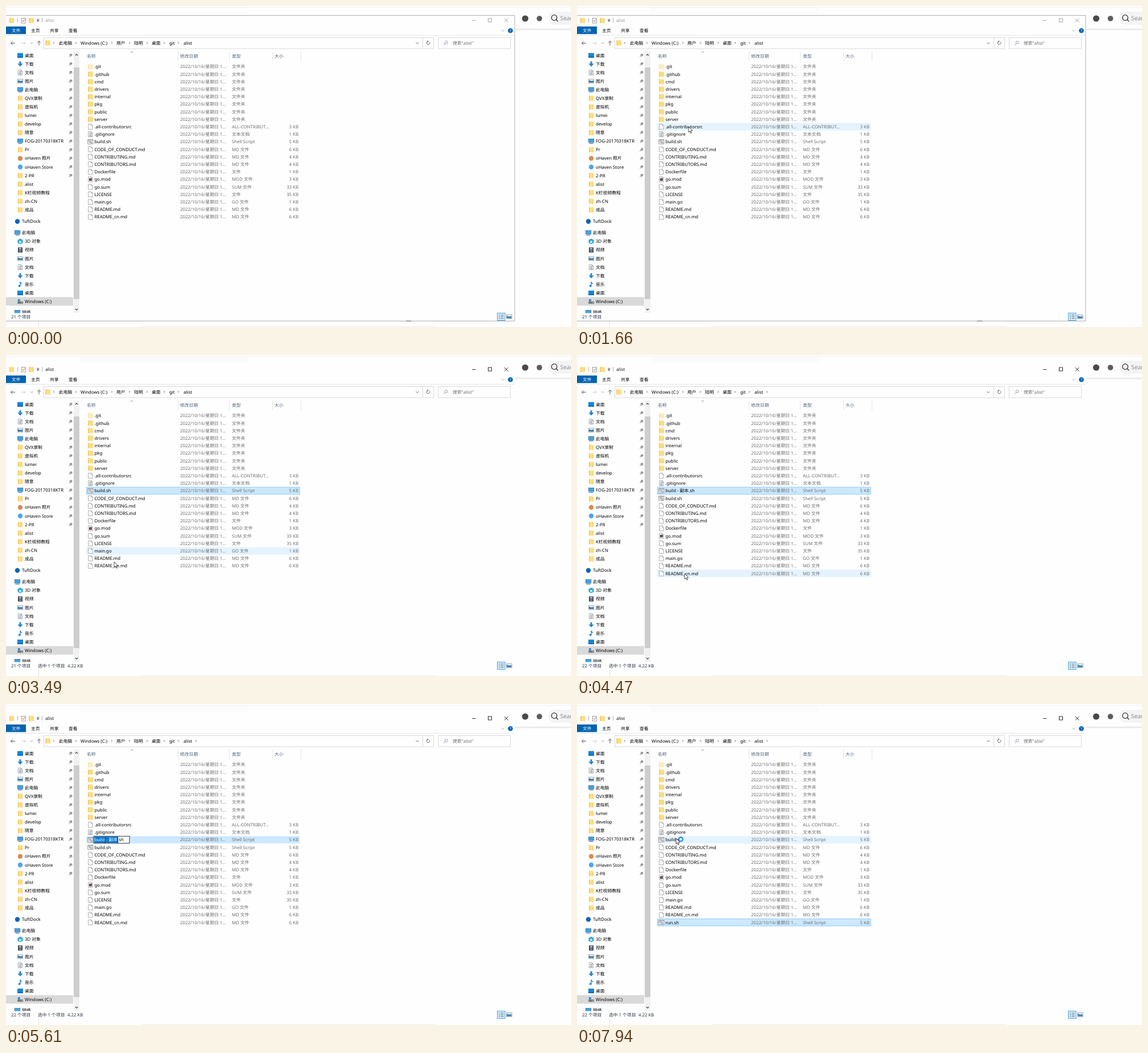
These frames come from a looping animation (993 by 564 pixels, 8000 ms). An HTML page:

```html
<!DOCTYPE html>
<html lang="zh-CN">
<head>
<meta charset="utf-8">
<style>
html, body { margin: 0; width: 100%; height: 100%; overflow: hidden; background: #fefefe; }
svg { display: block; font: 7.8px 'Noto Sans', 'Noto Sans CJK SC', sans-serif; text-rendering: geometricPrecision; }
.ime { font: 300 9.8px 'Noto Serif', 'Noto Sans CJK SC', serif; }
.typed { font: 9.5px Roboto, sans-serif; }
</style>
</head>
<body>
<svg width="993" height="564" viewBox="0 0 993 564"><g id="base"></g><g id="live"></g></svg>
<script>
const LOOP = 8000, ROW = 13.2, TOP = 106.5, GRAY = '#6d6d6d', BLUE = '#0078d7';

// y is the vertical centre of the text
const text = (x, y, s, fill = '#000', more = '') => `<text x="${x}" y="${y + 2.8}" fill="${fill}" ${more}>${s}</text>`;
const rect = (x, y, w, h, fill, stroke = 'none', more = '') =>
  `<rect x="${x}" y="${y}" width="${w}" height="${h}" fill="${fill}" stroke="${stroke}" ${more}/>`;
const path = (d, stroke, width = 1, fill = 'none') => `<path d="${d}" stroke="${stroke}" stroke-width="${width}" fill="${fill}"/>`;
const dot = (x, y, r, fill, stroke = 'none', width = 1) =>
  `<circle cx="${x}" cy="${y}" r="${r}" fill="${fill}" stroke="${stroke}" stroke-width="${width}"/>`;
const chevron = x => path(`M${x - 1} 63l1.8 1.8-1.8 1.8`, '#555', .8);
const thin = 'stroke-width=".7"';

// Icons, centred on x, y
const icons = {
  folder: (x, y) => rect(x - 4, y - 4.5, 8, 9, '#ffdf82') + rect(x - 4, y - 4.5, 1.2, 9, '#efc04e') + rect(x + 2.6, y - 3, 1.4, 7.5, '#f5cf68'),
  faded: (x, y) => `<g opacity=".5">${icons.folder(x, y)}</g>`,
  doc: (x, y) => path(`M${x - 3.7} ${y - 4.5}h5l2.4 2.4v6.6h-7.4zm5 0v2.4h2.4`, '#8c8c8c', .7, '#fff'),
  lines: (x, y) => icons.doc(x, y) + path(`M${x - 2.3} ${y - 1.7}h4.6m-4.6 1.7h4.6m-4.6 1.7h4.6m-4.6 1.5h4.6`, '#6f8ba3', .8),
  shell: (x, y) => rect(x - 4.6, y - 3.8, 9.2, 7.6, '#f4f4f4', '#777', thin) + path(`M${x - 4.6} ${y - 2.6}h9.2`, '#777', .7) +
    dot(x - 1.3, y - .2, 1.3, 'none', '#6c7f90', .8) + dot(x + 1.5, y + 1.4, 1.3, 'none', '#6c7f90', .8),
  mod: (x, y) => icons.doc(x, y) + rect(x - 2.3, y - 1.8, 4.6, 4.4, '#3c2a2a') + rect(x - .8, y - .4, 1.6, 1.6, '#e88'),
  desk: (x, y) => rect(x - 5, y - 4, 10, 8, '#1685d9') + rect(x - 5, y + 2.5, 10, 1.5, '#0a5fa8'),
  down: (x, y) => path(`M${x - 1.5} ${y - 4.5}h3v4h3.2L${x} ${y + 4.7}l-4.7-5.2h3.2z`, 'none', 0, '#2586cf'),
  image: (x, y) => rect(x - 4.8, y - 3.4, 9.6, 6.8, '#e9f4fb', '#8a8a8a', thin) + path(`M${x - 4} ${y + 2.6}v-4.4l4 1.6 4-.8v3.6z`, 'none', 0, '#2f79ad'),
  pc: (x, y) => rect(x - 4.8, y - 4, 9.6, 6.4, '#3ba3e8', '#4d6f8c', thin) + path(`M${x - 3.5} ${y + 4}h7`, '#52708a', 1.2),
  cube: (x, y) => path(`M${x} ${y - 4.8}l4.5 2.2v5.2l-4.5 2.2-4.5-2.2v-5.2z`, 'none', 0, '#2aa5d8') + rect(x - 2, y - 1, 4, 4, '#bfe8f7'),
  film: (x, y) => rect(x - 4, y - 4.5, 8, 9, '#40464c') + rect(x - 2.2, y - 3.6, 4.4, 3, '#9eb7c6') + rect(x - 2.2, y + .5, 4.4, 3, '#7d8f9c'),
  note: (x, y) => dot(x - 1.4, y + 2.8, 1.9, '#1685d9') + path(`M${x} ${y + 3}v-7.5q.5 2.5 3 3.6`, '#1685d9', 1.3),
  disk: (x, y) => rect(x - 4.8, y, 9.6, 4, '#777') + rect(x - 4, y - 4, 3.6, 3.6, '#1685d9') + rect(x + 1.5, y + 1.5, 2, 1, '#9f9'),
  warm: (x, y) => dot(x, y, 4.2, '#d98a4e'),
  sky: (x, y) => dot(x, y, 4.2, '#4aa6ee'),
  cloud: (x, y) => dot(x, y, 4.2, '#0a66b8')
};

const sidebar = `desk 桌面,down 下载,lines 文档,image 图片,pc 此电脑,folder QVX录制,folder 虚拟机,folder lumei,folder develop,folder 随意,pc FOG-20170318KTR,folder Pr,warm oHaven 照片,sky oHaven Store,folder 2-PR,folder alist,folder K栏视频教程,folder zh-CN,folder 成品`.split(',');
const computer = `cube 3D 对象,film 视频,image 图片,lines 文档,down 下载,note 音乐,desk 桌面,disk Windows (C:)`.split(',');

const files = [
  ...'.git,.github,cmd,drivers,internal,pkg,public,server'.split(',').map((n, i) => [n, i ? 'folder' : 'faded', '文件夹', '']),
  ['.all-contributorsrc', 'doc', 'ALL-CONTRIBUT...', 3], ['.gitignore', 'lines', '文本文档', 1],
  ['build.sh', 'shell', 'Shell Script', 5], ['CODE_OF_CONDUCT.md', 'doc', 'MD 文件', 6],
  ['CONTRIBUTING.md', 'doc', 'MD 文件', 4], ['CONTRIBUTORS.md', 'doc', 'MD 文件', 4],
  ['Dockerfile', 'doc', '文件', 1], ['go.mod', 'mod', 'MOD 文件', 3], ['go.sum', 'doc', 'SUM 文件', 33],
  ['LICENSE', 'doc', '文件', 35], ['main.go', 'doc', 'GO 文件', 1],
  ['README.md', 'doc', 'MD 文件', 6], ['README_cn.md', 'doc', 'MD 文件', 6]
];

function entry(item, x, y) {
  const [icon, ...words] = item.split(' ');
  return icons[icon](x, y) + text(x + 8, y, words.join(' '));
}

function drawPage() {
  return path('M0 2.5H993', '#f2f2f2') + rect(130, 3, 295, 11, '#fbfbfb') +
    path('M895 40.5H993', '#dcdcdc') + path('M895 42H993', '#f3f3f3', 2) +
    dot(912.5, 22, 5.6, '#4a4a4a') + dot(937.5, 22, 4.8, '#5c5c5c') + rect(953, 10, 60, 23, '#f4f4f5', 'none', 'rx="11.5"') +
    dot(963.5, 20.5, 4.8, 'none', '#333', 1.3) + path('M967 24l3.2 3.2', '#333', 1.3) +
    text(974, 21.8, 'Search', '#8a8a8a', 'font-size="10.3"') + path('M57.5 554V564', '#ddd') + path('M238 563.5H755', '#ececec');
}

function drawChrome() {
  let s = rect(0, 16, 894, 538, '#fefefe');
  s += icons.folder(10, 25.5) + path('M20.5 21v8m43-8v8', '#999', .8) + rect(27.5, 21.5, 7, 8.5, '#fff', '#777', thin) +
    path('M29 25.5l1.6 1.8 3-4', '#c4623a') + icons.folder(44.5, 25.5) + path('M54 23.5h4.5', '#333', .8) + path('M54 25.3h4.5l-2.2 2.4z', 'none', 0, '#333');
  s += rect(0, 36, 35, 13.3, '#0063b1') + text(10, 43.2, '文件', '#fff') + text(44, 43.2, '主页') + text(77, 43.2, '共享') + text(110, 43.2, '查看');
  s += path('M870.5 42l2.5 2.5 2.5-2.5', '#999', .8) + dot(886.5, 43.3, 4.3, '#0063b1') + text(886.5, 43.3, '?', '#fff', 'text-anchor="middle" font-size="7"');
  s += path('M0 51.5H894', '#e6e6e6');
  s += path('M16 65.3H8.5l3-3m-3 3l3 3', '#444', .9) + path('M27 65.3h7.5l-3-3m3 3l-3 3', '#ccc', .9) +
    path('M43.3 64.3l1.9 1.9 1.9-1.9', '#777', .8) + path('M58 69v-7.5l-3 3m3-3l3 3', '#444', .9);
  s += rect(66.5, 55.5, 685, 19.5, '#fefefe', '#dadada') + path('M732.5 55.5v19.5', '#dadada') + path('M720.5 64l2.5 2.5 2.5-2.5', '#555', .9) +
    path('M744.5 63.2a2.9 2.9 0 1 1-3-1.2m0-1.5v2.5h-2', '#555', .9) + icons.folder(73.5, 64.8);
  s += [84, 123, 186, 217, 248, 278, 303].map(chevron).join('');
  s += [[93, '此电脑'], [131, 'Windows (C:)'], [194, '用户'], [225, '陆明'], [256, '桌面'], [287, 'git'], [312, 'alist']]
    .map(([x, w]) => text(x, 64.8, w)).join('');
  s += rect(759.5, 55.5, 127, 19.5, '#fefefe', '#dadada') + dot(773.8, 64, 2.4, 'none', '#7b8ca0', .8) + path('M772 66l-2.6 2.6', '#7b8ca0', .9) +
    text(785, 64.8, '搜索"alist"', GRAY);
  s += [[142, '名称'], [306, '修改日期'], [397, '类型'], [472, '大小']].map(([x, w]) => text(x, 88, w, '#4c607a')).join('') +
    path('M302.5 80V97M392.5 80V97M468.5 80V97M518.5 80V97', '#e4e4e4') + path('M218.5 82l2.3-2 2.3 2', '#777', .8);
  return s;
}

function drawSidebar() {
  let s = rect(0, 511.5, 118, 15, '#d9d9d9');
  sidebar.forEach((item, i) => {
    const y = 86.7 + i * 15.08;
    s += entry(item, 25, y);
    if (i < 15) s += path(`M110.5 ${y + 3}l2.2-2.2m-1.6-1.6l3.2 3.2m-2.2-3.2l2-2 2.2 2.2-2 2`, '#5f6468', .8, '#9a9ea2');
  });
  s += entry('cloud TuftDock', 20, 378.5) + entry('pc 此电脑', 20, 398.5);
  computer.forEach((item, i) => s += entry(item, 25, 413.6 + i * 15.08));
  s += `<svg x="0" y="0" width="118" height="539.5">${entry('pc 网络', 20, 538.5)}</svg>`;
  s += rect(119, 80, 10, 459, '#f1f1f1') + rect(119, 108, 10, 407, '#cdcdcd') +
    path('M121.8 87l2.2-2.2 2.2 2.2M121.8 532l2.2 2.2 2.2-2.2', '#444', 1.1);
  s += rect(863.5, 539.5, 13.5, 13, '#d4ecfb', '#4aa8dc') +
    path('M866 543h2m-2 3h2m-2 3h2M869.5 543h5m-5 3h5m-5 3h5', '#556', .9) + icons.image(884.3, 546);
  return s;
}

const route = [[130, 837, 536], [350, 754, 503], [500, 754, 503], [1300, 302, 373], [1640, 196, 212], [1700, 196, 212],
  [2150, 186, 250], [2170, 186, 250], [2400, 184, 239], [3330, 184, 239], [3490, 190, 363], [3750, 193, 425],
  [4180, 193, 425], [4780, 185, 340], [4870, 183, 296], [4940, 183, 247], [5140, 174, 236], [LOOP, 174, 236]];

function pointer(t) {
  const i = Math.max(1, route.findIndex(k => k[0] >= t)), [t0, x0, y0] = route[i - 1], [t1, x1, y1] = route[i];
  const p = Math.max(0, (t - t0) / (t1 - t0));
  return [x0 + (x1 - x0) * p, y0 + (y1 - y0) * p];
}

function drawFrame(active) {
  const ink = active ? '#111' : '#999';
  return (active ? '' : path('M0 16.5H894V553.5H0', '#b0b0b0') + path('M703 553.5h9', '#555')) + text(69, 25.5, 'alist', ink) +
    path('M819 25.5h6.5M876 22l6.5 6.5m0-6.5l-6.5 6.5', ink, .9) + rect(847.5, 22, 6, 6, 'none', ink, 'stroke-width=".9"');
}

function drawIme(typed) {
  const words = { r: '人 日 让 如 热 然 入 任 肉', ru: '如 入 儒 乳 辱 茹 汝 褥 蠕', run: '润 run 闰 潤 膶 閏 橍 閠 瞤' }[typed].split(' ');
  let s = rect(198.5, 246.5, 271, 42, '#f4f5f7', '#4192e4') + path('M202 266.5H466', '#e0e2e5') +
    text(208, 257.5, typed, '#555', 'class="typed"');
  words.forEach((w, i) => s += text(208 + 26.4 * i + (typed == 'run' && i > 1 ? 4.8 : 0), 277.5, `${i + 1}.${w}`, i ? '#707070' : '#2b8ae8'));
  const end = 208 + { r: 3.5, ru: 8.7, run: 14 }[typed];
  return `<g class="ime">${s}</g>` + path(`M${end} 252V262`, '#333', .8) +
    path('M452 275l-2 2 2 2', '#bbb', .8) + path('M458.5 274.5v5l3.2-2.5z', 'none', 0, '#2b8ae8');
}

function drawEdit(t) {
  const y = TOP + ROW * 10, done = t >= 7010;
  const caret = done ? t < 7540 : t < 6210 || t >= 6680;
  return rect(154, y - 6.2, 63, 12.4, '#fff', '#222', 'stroke-width=".9"') +
    (done ? text(155.5, y, 'run.sh') : rect(155, y - 5.4, 42, 10.8, BLUE) +
      text(155.5, y, '<tspan fill="#fff">build - 副本</tspan>.sh')) +
    (caret ? path(`M${done ? 167.6 : 196.6} 233.5V244`, '#111', .8) : '') +
    path('M172.5 234.5h3m-1.5 0v9m-1.5 0h3', '#333', .7);
}

function drawLive(t) {
  const copied = t >= 4320, sorted = t >= 7740, editing = t >= 5470 && t < 7680;
  const copy = [t < 7010 ? 'build - 副本.sh' : 'run.sh', 'shell', 'Shell Script', 5];
  const list = files.slice();
  if (copied) list.splice(sorted ? list.length : 10, 0, copy);
  const selected = t < 2620 || t >= 3900 && !copied ? -1 : sorted ? list.length - 1 : 10;
  const [hx, hy] = pointer(t - 20);
  const hover = t > 1340 && !editing && hx > 141 && hx < 516 ? Math.floor((hy - TOP) / ROW + .5) : -1;

  let s = drawFrame(t >= 2620);
  list.forEach(([name, icon, type, size], i) => {
    const y = TOP + ROW * i;
    if (i == selected) s += rect(141.4, y - 6.3, 374.8, 12.6, '#cce8ff', editing ? 'none' : '#7fc3f5', 'stroke-width=".8"');
    else if (i == hover) s += rect(141, y - 6.6, 375.5, ROW, '#e5f3ff');
    s += icons[icon](148.4, y) + text(155.5, y, name) + text(306, y, '2022/10/16/星期日 1...', GRAY) + text(397, y, type, GRAY);
    if (size) s += text(514, y, size + ' KB', GRAY, 'text-anchor="end"');
  });
  s += text(9, 546, `${list.length} 个项目`, '#26344a');
  if (selected >= 0) s += text(56, 546, '选中 1 个项目', '#26344a') + text(108, 546, '4.22 KB', '#26344a');
  if (copied) s += chevron(334);
  if (editing) {
    s += drawEdit(t);
    if (t >= 6210 && t < 7010) s += drawIme(t < 6340 ? 'r' : t < 6470 ? 'ru' : 'run');
  } else if (t >= 130) {
    const [x, y] = pointer(t);
    s += `<g transform="translate(${x.toFixed(1)} ${y.toFixed(1)})">` +
      path('M0 0v9.8l2.2-2 1.6 3.7 1.6-.7-1.6-3.6h3.1z', '#222', .8, '#fff') +
      (t >= 7870 ? dot(8.5, 1.5, 3.6, '#cdeafc', '#1b86d6', 2) : '') + '</g>';
  }
  return s;
}

const live = document.getElementById('live');
document.getElementById('base').innerHTML = drawPage() + drawChrome() + drawSidebar();
let shown = '';
function tick() {
  const next = drawLive(performance.now() % LOOP);
  if (next != shown) live.innerHTML = shown = next;
  requestAnimationFrame(tick);
}
tick();
</script>
</body>
</html>
```
